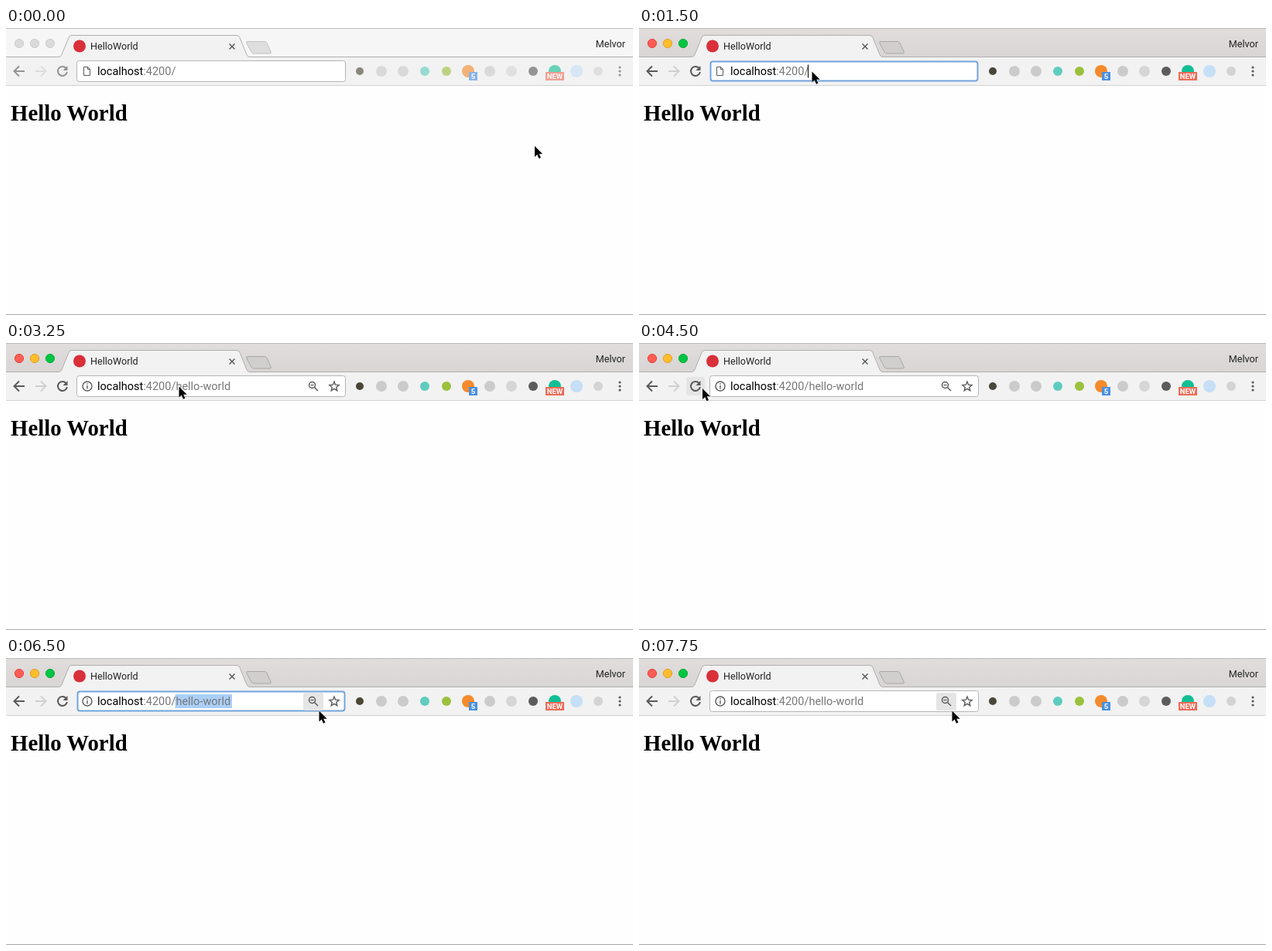
These frames come from a looping animation (810 px wide and 372 px high, 8 s). An HTML page:

```html
<!DOCTYPE html>
<html lang="en">
<head>
<meta charset="utf-8">
<title>Browser redirect</title>
<style>
  html, body { margin: 0; width: 100%; height: 100%; overflow: hidden; background: #fefefe; }
  svg { display: block; width: 100%; height: 100%; font: 14.5px Roboto, sans-serif; }
  .hidden { display: none; }
  .strip { fill: #f6f6f6; }
  .active .strip { fill: url(#stripFill); }
  #lights circle { fill: #dadada; stroke: #cdcdcd; }
  .active #lights circle { fill: var(--on); stroke: var(--edge); }
  #newTab { fill: #dedede; stroke: #c2c2c2; }
  .active #newTab { fill: #d0cfce; stroke: #a9a8a7; }
  .bar { opacity: .62; }
  .active .bar { opacity: 1; }
  .line { fill: none; stroke: #5a5a5a; stroke-width: 2; }
  #field { x: 91.5px; y: 42.5px; width: 347px; height: 27px; fill: #fff; stroke: #b5b5b5; }
  #field.focus { x: 92.5px; y: 43.5px; width: 345px; height: 25px; stroke: #72a4dc; stroke-width: 2; }
  .dim { fill: #787878; }
  .hover { fill: #e5e5e5; }
  .badge { fill: #fff; font: bold 9.5px Roboto, sans-serif; text-anchor: middle; }
  .small { font-size: 12.6px; fill: #222; }
  #heading { font: bold 28.8px "Liberation Serif", serif; }
  #menu text { fill: #585858; word-spacing: 1.5px; }
  #menu .link { fill: #3060d0; }
  #menu .match { font-weight: bold; }
  #menu .query { fill: #000; }
</style>
</head>
<body>
<svg id="stage" viewBox="0 0 810 372" preserveAspectRatio="none">
  <defs>
    <linearGradient id="stripFill" x2="0" y2="1">
      <stop stop-color="#e0dddc"/><stop offset="1" stop-color="#d8d5d4"/>
    </linearGradient>
    <linearGradient id="shadow" x2="0" y2="1">
      <stop stop-color="#d2d2d2"/><stop offset=".2" stop-color="#d6d6d6"/>
      <stop offset=".5" stop-color="#f2f2f2"/><stop offset="1" stop-color="#fefefe"/>
    </linearGradient>
    <path id="page" class="line" style="stroke-width:1" d="M-4-5.500h5l3 3v8h-8zM1-5.500v3h3"/>
    <g id="lens" class="line" style="stroke-width:1.500">
      <circle cx="-1.500" cy="-1.500" r="4"/><path d="M1.500 1.500 6 6"/>
    </g>
  </defs>

  <rect width="810" height="372" fill="#fefefe"/>
  <rect class="strip" width="810" height="38"/>
  <path d="M0 .5h810" stroke="#bdbdbd"/>
  <g id="lights"></g>
  <path id="newTab" d="M312 17.500h22q2 0 3 2l5 11q1 2.500-1 2.500h-21q-2 0-3-2l-6-11q-1-2.500 1-2.500z"/>
  <rect y="38" width="810" height="36" fill="#f2f2f2"/>
  <path d="M0 37.500H68q3 0 4-3l9-22q1-3 4-3H298q3 0 4 3l9 22q1 3 4 3H810V40H0z" fill="#f2f2f2"/>
  <path d="M0 37.500H68q3 0 4-3l9-22q1-3 4-3H298q3 0 4 3l9 22q1 3 4 3H810" fill="none" stroke="#b0afae"/>
  <path d="M0 74.500h810" stroke="#d2d2d2"/>
  <circle cx="95" cy="23.500" r="8" fill="#d9303a"/>
  <text class="small" x="109" y="28">HelloWorld</text>
  <path class="line" style="stroke-width:1.500" d="M288.500 20.500l7 7m0-7-7 7"/>
  <text class="small" x="800" y="25" text-anchor="end">Melvor</text>

  <rect id="reloadHover" class="hover" x="61" y="44" width="24" height="24" rx="3"/>
  <g class="bar line">
    <path d="M24 56H11M17 49.500 10.500 56l6.500 6.500"/>
    <path stroke="#d0d0d0" d="M38 56h13M45 49.500l6.500 6.500-6.500 6.500"/>
    <path d="M77.500 52a6 6 0 1 0 1.400 5"/>
    <path d="M79.500 49v6h-6z" fill="#5a5a5a" stroke="none"/>
  </g>

  <rect id="field" rx="3"/>
  <rect id="zoomHover" class="hover" x="384" y="45" width="26" height="23" rx="2"/>
  <use id="pageIcon" href="#page" x="104.500" y="56"/>
  <g id="loadedIcons" class="line" style="stroke-width:1.400">
    <circle cx="105" cy="56" r="6"/><path d="M105 55v4.500M105 52.200v1.600"/>
    <use href="#lens" x="397" y="56"/><path d="M393.500 54.500h4" stroke-width="1.300"/>
    <path id="star"/>
  </g>
  <rect id="selection" x="218.500" y="47" height="18" fill="#abcff8"/>
  <text x="118" y="61">localhost<tspan class="dim">:4200/<tspan id="path"></tspan></tspan></text>
  <path id="caret" d="M218.500 47.500v17" stroke="#000"/>
  <g id="extensions" class="bar"></g>
  <g class="bar" fill="#5a5a5a"><circle cx="793" cy="51" r="1.600"/><circle cx="793" cy="56" r="1.600"/><circle cx="793" cy="61" r="1.600"/></g>

  <text id="heading" x="6" y="120">Hello World</text>

  <g id="menu">
    <rect y="75" width="810" height="133" fill="#fefefe"/>
    <rect y="208" width="810" height="7" fill="url(#shadow)"/>
    <rect y="79" width="810" height="25" fill="#e9e9e9"/>
    <g id="rows"></g>
  </g>
  <path d="M0 371.500h810" stroke="#a9a9a9"/>
  <path id="cursor" d="M0 0v14l3.200-3 2.300 5.200 2.500-1.100-2.300-4.900h4.500z" fill="#000" stroke="#fff" paint-order="stroke"/>
</svg>
<script>
const $ = id => document.getElementById(id);
const STEP = 250, LOOP = 8000, PATH = 'hello-world', FULL_SELECTION = 73.5;

$('lights').innerHTML = [['#ff5c54', '#e2463f'], ['#ffbd2e', '#dfa023'], ['#00c543', '#13a83b']]
  .map(([on, edge], i) => `<circle cx="${17 + 20 * i}" cy="20" r="5.6" style="--on:${on};--edge:${edge}"/>`).join('');

$('star').setAttribute('d', 'M' + Array.from({ length: 10 }, (_, i) => {
  const r = i % 2 ? 2.8 : 6.4, a = i * Math.PI / 5;
  return `${(424 + r * Math.sin(a)).toFixed(1)} ${(56.5 - r * Math.cos(a)).toFixed(1)}`;
}).join('L') + 'z');

// Toolbar buttons: colour and radius, evenly spaced.
const buttons = [['#4a4638', 5], ['#cbcbcb', 7], ['#cbcbcb', 7], ['#5fccc0', 6], ['#9bc13c', 6], ['#f58a2c', 8],
  ['#cbcbcb', 7], ['#d6d6d6', 7], ['#5c5c5c', 6], ['#12bf94', 8], ['#c5dff6', 8], ['#d3d3d3', 6]];
const badge = (x, y, w, h, color, label) =>
  `<rect x="${x}" y="${y}" width="${w}" height="${h}" fill="${color}"/>` +
  `<text class="badge" x="${x + w / 2}" y="${y + h - 2}">${label}</text>`;
$('extensions').innerHTML = buttons
  .map(([color, r], i) => `<circle cx="${457 + 28 * i}" cy="56" r="${r}" fill="${color}"/>`).join('') +
  badge(598, 57, 11, 11, '#4a90e2', '5') + badge(697, 57, 24, 11, '#ee6a57', 'NEW');

// Suggestions: bold part, plain part, page title.
const suggestions = [
  ['localhost:4200', '', 'HelloWorld'],
  ['localhost:4200/', PATH, 'HelloWorld'],
  ['localhost:4200/', 'collection', 'AddressBook'],
  ['', 'localhost:4200/', 'Zelvia Sök'],
  ['localhost:4200/', 'contacts', 'AddressBook']
];
$('rows').innerHTML = suggestions.map(([match, rest, title], i) => {
  const y = 92 + 25 * i;
  return `<use href="#${match ? 'page' : 'lens'}" x="104.5" y="${y}"/><text x="118" y="${y + 5}">` +
    `<tspan class="link match">${match}</tspan><tspan class="${match ? 'link' : 'query'}">${rest}</tspan> - ${title}</text>`;
}).join('');

// Time, pointer position, and whatever changes at that moment.
const timeline = [
  [0, 683, 153, { active: false, focus: false, caret: false, loaded: false, path: '', selected: 0,
    heading: true, menu: false, reloadHover: false, zoomHover: false }],
  [250, 676, 160], [500, 610, 165], [750, 420, 124], [1000, 212, 52], [1250, 223.5, 56.5],
  [1500, 223.5, 56.5, { active: true, focus: true, caret: true }],
  [2500, 223.5, 56.5, { focus: false, caret: false, loaded: true, heading: false }],
  [3000, 223.5, 56.5, { path: PATH, heading: true }],
  [4000, 205, 58], [4250, 140, 60], [4500, 82, 59, { reloadHover: true }], [4750, 74, 57], [5000, 73, 57],
  [5250, 196, 64, { reloadHover: false }], [5500, 211.5, 66],
  [5750, 217, 58, { focus: true }],
  [6000, 262, 61, { selected: 44 }],
  [6250, 404.5, 68.5, { selected: FULL_SELECTION }],
  [6500, 404.5, 68.5, { zoomHover: true }],
  [7000, 404.5, 68.5, { loaded: false, zoomHover: false, selected: 0, path: '', caret: true, menu: true }],
  [7500, 404.5, 68.5, { focus: false, caret: false, loaded: true, menu: false, heading: false, zoomHover: true }],
  [7750, 404.5, 68.5, { path: PATH, heading: true }]
];

const stateAt = time => timeline.filter(([start]) => start <= time)
  .reduce((state, [, x, y, change]) => ({ ...state, x, y, ...change }), {});
const show = (id, visible) => $(id).classList.toggle('hidden', !visible);

function render(time) {
  const s = stateAt(time);
  $('stage').classList.toggle('active', s.active);
  $('field').classList.toggle('focus', s.focus);
  for (const id of ['caret', 'heading', 'menu', 'reloadHover', 'zoomHover']) show(id, s[id]);
  show('loadedIcons', s.loaded);
  show('pageIcon', !s.loaded);
  $('path').textContent = s.path;
  $('selection').setAttribute('width', s.selected);
  $('cursor').setAttribute('transform', `translate(${s.x} ${s.y})`);
}

const begin = performance.now();
let shown = -1;
function tick() {
  const time = Math.floor((performance.now() - begin) % LOOP / STEP) * STEP;
  if (time !== shown) render(shown = time);
  requestAnimationFrame(tick);
}
tick();
</script>
</body>
</html>
```
